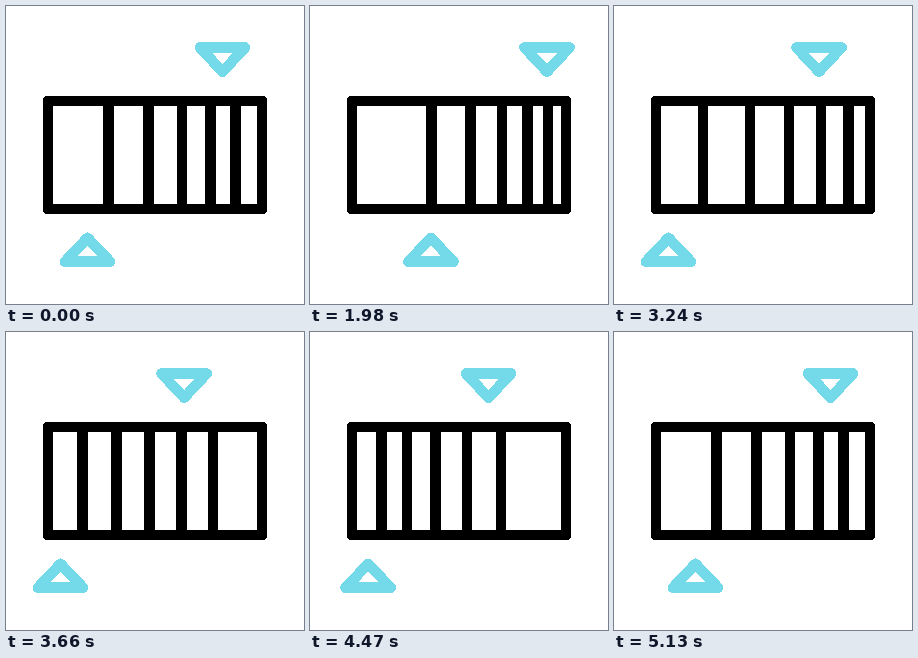
An HTML page for the animation above (5.4 s loop, 298x298 px).

```html
<!DOCTYPE html>
<html lang="en">
<head>
<meta charset="utf-8">
<title>Sliding bars</title>
<style>
html, body { margin: 0; width: 100%; height: 100%; overflow: hidden; background: #fff; }
svg { display: block; width: 100%; height: 100%; shape-rendering: crispEdges; }
.bar { stroke: #000; stroke-width: 10.4; }
.mark { fill: none; stroke: #74d9e9; stroke-width: 10.6; stroke-linejoin: round; }
</style>
</head>
<body>
<svg viewBox="0 0 298 298">
  <rect x="37" y="90" width="224" height="118" rx="4"/>
  <rect x="47" y="100" width="204" height="98" fill="#fff"/>
  <g id="bars"></g>
  <path id="top" class="mark" d="M-22.6 41.5H22.6L0 65.7Z"/>
  <path id="bottom" class="mark" d="M-22.6 255.7H22.6L0 231.8Z"/>
</svg>
<script>
const LOOP = 5400, STEP = 30, COUNT = 5, SKEW = 0.15;
const byId = id => document.getElementById(id);

// Cubic ease (.5, 0, .5, 1), solved by bisection
function ease(u) {
  if (u <= 0) return 0;
  if (u >= 1) return 1;
  let lo = 0, hi = 1;
  for (let i = 0; i < 24; i++) {
    const s = (lo + hi) / 2;
    if (1.5 * s * (1 - s) + s * s * s < u) lo = s; else hi = s;
  }
  return lo * lo * (3 - 2 * lo);
}

const phase = (start, end) => t => ease((t - start) / (end - start));
const topOut = phase(0, 780);
const bottomOut = phase(600, 1200);
const bottomBack = phase(1950, 3060);
const barsSpread = phase(1950, 3315);
const topBack = phase(2475, 4010);
const barsBack = phase(3062, 4180);
const home = phase(4215, 5130);

// A value that moves in each phase and always returns home at the end
const track = (from, ...moves) => {
  const total = moves.reduce((sum, [, d]) => sum + d, 0);
  return t => moves.reduce((x, [p, d]) => x + d * p(t), from - total * home(t));
};

const topX = track(216.5, [topOut, 20.5], [topBack, -64.4]);
const bottomX = track(81.5, [bottomOut, 39.5], [bottomBack, -66.5]);
const firstX = track(102.5, [bottomOut, 19], [barsSpread, -32], [barsBack, -23]);
const lastX = track(229.5, [topOut, 7.3], [bottomOut, 1.2], [barsSpread, -1.5], [barsBack, -51.5]);
const bulge = track(10, [topOut, 4], [bottomOut, -1.5], [barsSpread, 1.7], [barsBack, -22.2]);

const bars = Array.from({ length: COUNT }, () => {
  const el = document.createElementNS("http://www.w3.org/2000/svg", "path");
  el.setAttribute("class", "bar");
  el.setAttribute("d", "M0 95V203");
  byId("bars").append(el);
  return el;
});

const shift = (el, x) => el.setAttribute("transform", `translate(${x.toFixed(2)} 0)`);

function draw(time) {
  const t = Math.floor((time % LOOP) / STEP) * STEP;
  shift(byId("top"), topX(t));
  shift(byId("bottom"), bottomX(t));
  const a = firstX(t), b = lastX(t), bend = bulge(t);
  bars.forEach((el, i) => {
    const s = i / (COUNT - 1);
    const arch = 4 * s * (1 - s) * (1 + SKEW * (1 - 2 * s));
    shift(el, a + (b - a) * s + bend * arch);
  });
}

let begin;
function tick(now) {
  begin ??= now;
  draw(now - begin);
  requestAnimationFrame(tick);
}
draw(0);
requestAnimationFrame(tick);
</script>
</body>
</html>
```
